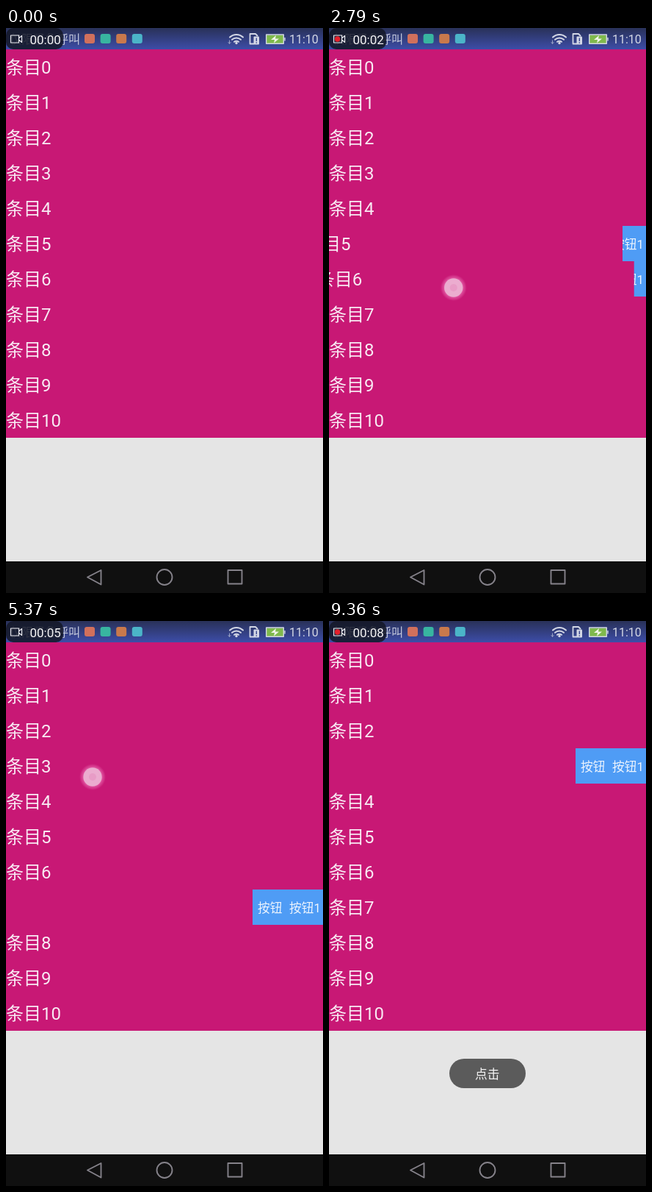
Write an HTML page with a canvas that moves like this. It is 432 px wide and 768 px high and loops after 9500 ms.

```html
<!DOCTYPE html>
<html lang="zh-CN">
<head>
<meta charset="utf-8">
<title>条目</title>
<style>
  html, body { margin: 0; width: 100%; height: 100%; overflow: hidden; background: #101010; }
  canvas { display: block; }
</style>
</head>
<body>
<canvas id="stage" width="432" height="768"></canvas>
<script>
const ctx = document.getElementById('stage').getContext('2d');
const LOOP = 9500, TOP = 29, ROW = 48, OPEN = 96, DRAG = 360, SETTLE = 310;

// Each swipe opens one row and closes the one before it.
const swipes = [
  { row: 5, start: 1100, x: 200, y: 300 },
  { row: 6, start: 2730, x: 186, y: 353 },
  { row: 7, start: 4150, x: 180, y: 396 },
  { row: 3, start: 5390, x: 118, y: 212 }
];
const tap = { x: 367, y: 201, down: 7060, up: 7160 };
const TOAST_START = 7195, TOAST_FADE = 400;

const clamp = v => Math.max(0, Math.min(1, v));
const easeOut = u => 1 - (1 - u) ** 5;
const dragged = (swipe, t) => OPEN * clamp((t - swipe.start) / DRAG);

function text(str, x, y, size, color) {
  ctx.font = `${size}px Roboto, "Noto Sans CJK SC", "Noto Sans CJK", sans-serif`;
  ctx.fillStyle = color;
  ctx.fillText(str, x, y);
}

function rect(x, y, w, h, color, radius = 0) {
  ctx.fillStyle = color;
  ctx.beginPath();
  ctx.roundRect(x, y, w, h, radius);
  ctx.fill();
}

function disc(x, y, r, color) {
  ctx.fillStyle = color;
  ctx.beginPath();
  ctx.arc(x, y, r, 0, 7);
  ctx.fill();
}

function line(path, color, width) {
  ctx.strokeStyle = color;
  ctx.lineWidth = width;
  ctx.lineJoin = 'round';
  ctx.stroke(new Path2D(path));
}

function rowOffset(row, t) {
  const i = swipes.findIndex(s => s.row === row);
  if (i < 0) return 0;
  const next = swipes[i + 1];
  const closing = next ? easeOut(clamp((t - next.start) / SETTLE)) : 0;
  return dragged(swipes[i], t) * (1 - closing);
}

function drawRows(t) {
  rect(0, TOP, 432, 528, '#c81875');
  for (let i = 0; i <= 10; i++) {
    const y = TOP + i * ROW, offset = rowOffset(i, t);
    text('条目' + i, -offset, y + 33, 24, '#f8eaf3');
    if (!offset) continue;
    ctx.save();
    ctx.beginPath();
    ctx.rect(432 - offset, y, offset, ROW);
    ctx.clip();
    rect(336, y, OPEN, ROW, '#4f9cf5');
    text('按钮', 343, y + 30.5, 16.8, '#edf4fd');
    text('按钮1', 386, y + 30.5, 16.8, '#edf4fd');
    ctx.restore();
  }
}

function drawStatusBar(t) {
  const shade = ctx.createLinearGradient(0, 0, 0, TOP);
  shade.addColorStop(0, '#293158');
  shade.addColorStop(1, '#3d4da8');
  rect(0, 0, 432, TOP, shade);
  text('仅限紧急呼叫', 5, 21, 16, '#c3c8dc');
  ['#d1705c', '#38b5a0', '#c9794c', '#4bb5c8'].forEach((color, i) =>
    rect(107 + i * 21.6, 8, 14, 13, color, 3));

  const pale = '#d3d7e5';
  ctx.lineCap = 'round';
  line('M305 12.5A13 13 0 0 1 323 12.5M308 15.8A9 9 0 0 1 320 15.8M311 18.8A5 5 0 0 1 317 18.8', pale, 2);
  disc(314, 20.5, 1.7, pale);
  line('M304.500 17v4M303 19.500l1.500 2 1.500-2', '#9aa3c6', 1);
  ctx.lineCap = 'butt';
  line('M338 21.500H332.500V8H340L343 11', pale, 1.8);
  rect(337.500, 11.500, 7.500, 11, pale, 1);
  rect(340.600, 13.500, 1.400, 4.500, '#36448d');
  rect(340.600, 19.300, 1.400, 1.500, '#36448d');

  rect(355, 9.500, 23, 11.500, '#7fb94c', 1);
  line('M354.700 9H378.300V21.300H354.700ZM380 13V17.500', pale, 1.4);
  ctx.fillStyle = '#f0f4e8';
  ctx.fill(new Path2D('M368 10L361 16H366L365 20.500L372 14.500H367Z'));
  text('11:10', 386, 20.5, 16, pale);

  // Screen recorder badge with blinking dot
  const clock = (t * 0.93 + 200) / 1000;
  rect(0, 0, 78, TOP, 'rgba(20,23,38,.84)', 10);
  line('M6.500 10H17.500V20H6.500ZM17.500 14L21.500 10.500V19.500L17.500 16', '#e8e8ee', 1.2);
  if (clock % 1 > 0.72) disc(11.5, 15, 3.7, '#e5202c');
  text('00:0' + Math.floor(clock), 32.5, 21.5, 17, '#f4f4f6');
}

function drawNavBar() {
  rect(0, 557, 432, 168, '#e5e5e5');
  rect(0, 725, 432, 43, '#101010');
  line('M111 746.500L129.500 737V756.500ZM302.500 737H321.500V755.500H302.500Z' +
       'M205.500 746.500a10.500 10.500 0 1 0 21 0a10.500 10.500 0 1 0 -21 0', '#85828a', 1.9);
}

function drawTouch(x, y, alpha) {
  ctx.globalAlpha = alpha;
  const glow = ctx.createRadialGradient(x, y, 12, x, y, 18);
  glow.addColorStop(0, 'rgba(255,160,215,.5)');
  glow.addColorStop(1, 'rgba(255,160,215,0)');
  disc(x, y, 18, glow);
  disc(x, y, 12.7, 'rgba(240,225,235,.6)');
  disc(x, y, 5, 'rgba(225,120,180,.3)');
  ctx.globalAlpha = 1;
}

function drawTouches(t) {
  for (const s of swipes)
    if (t > s.start - 70 && t < s.start + DRAG + 50) drawTouch(s.x - dragged(s, t), s.y, 1);
  if (t > tap.down) {
    const alpha = 0.6 * (1 - clamp((t - tap.up) / 140));
    if (alpha) {
      ctx.globalAlpha = alpha;
      disc(tap.x, tap.y, 13, 'rgba(225,235,250,.75)');
      ctx.globalAlpha = 1;
    }
  }
}

function drawToast(t) {
  ctx.globalAlpha = clamp((t - TOAST_START) / TOAST_FADE);
  rect(164, 595, 104, 40, '#5b5b5b', 20);
  text('点击', 199, 621.5, 16.8, '#f4f4f4');
  ctx.globalAlpha = 1;
}

function frame(now) {
  const t = now % LOOP;
  drawRows(t);
  drawNavBar();
  drawStatusBar(t);
  drawToast(t);
  drawTouches(t);
  requestAnimationFrame(frame);
}
requestAnimationFrame(frame);
</script>
</body>
</html>
```
